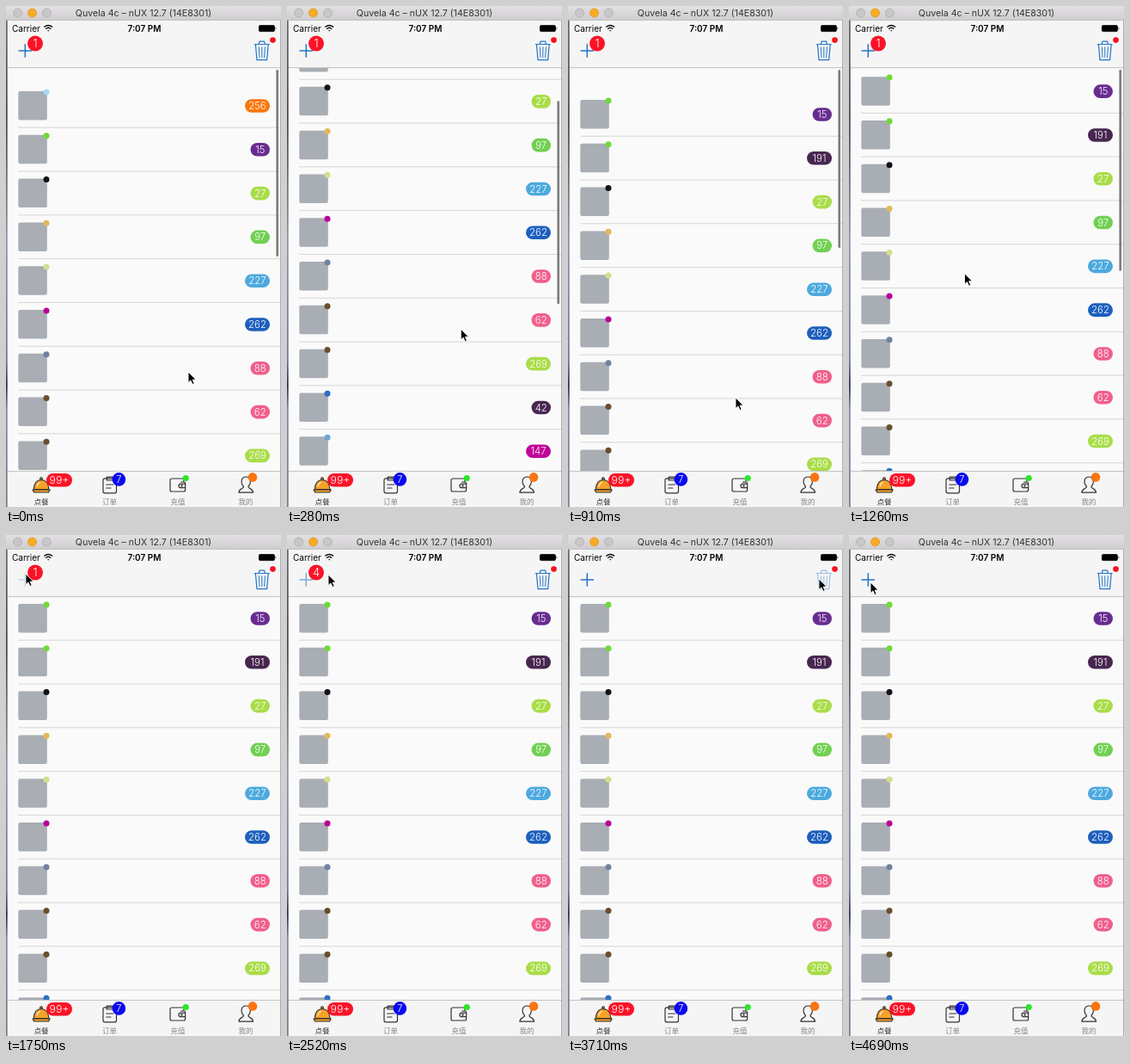
An HTML page that plays this animation: 320 px wide and 582 px high, repeating every 4.76 s.

```html
<!DOCTYPE html>
<html lang="en">
<head>
<meta charset="utf-8">
<title>Badge list</title>
<style>
  html, body { margin: 0; width: 100%; height: 100%; overflow: hidden; background: #fafafa; }
  svg { display: block; width: 100%; height: 100%; font-family: Inter, "Noto Sans", sans-serif; }
  .num { fill: #fff; font-weight: 300; text-anchor: middle; }
  .line { fill: none; stroke: #333; stroke-width: 1.2; stroke-linejoin: round; stroke-linecap: round; }
  .tab { font: 8.5px "Noto Sans CJK SC", "Noto Sans CJK", sans-serif; fill: #858585; text-anchor: middle; }
  .blue { fill: none; stroke: #2474c6; }
</style>
</head>
<body>
<svg viewBox="0 0 320 582" preserveAspectRatio="none">
  <defs>
    <linearGradient id="bar" x2="0" y2="1">
      <stop stop-color="#e2e0e2"/><stop offset="1" stop-color="#cfcdcf"/>
    </linearGradient>
    <linearGradient id="edge" x2="0" y2="1">
      <stop stop-color="#6a6670"/><stop offset=".2" stop-color="#454450"/>
      <stop offset=".45" stop-color="#8d92a6"/><stop offset=".7" stop-color="#6d7696"/>
      <stop offset=".75" stop-color="#252b48"/><stop offset=".8" stop-color="#8187a0"/>
      <stop offset="1" stop-color="#777b8e"/>
    </linearGradient>
    <clipPath id="view"><path d="M0 72H320V540H0Z"/></clipPath>
  </defs>

  <path d="M0 0H320V582H0Z" fill="#fafafa"/>
  <g clip-path="url(#view)">
    <g id="rows"></g>
    <rect id="thumb" x="314.4" width="2.6" rx="1.3" fill="#7c7c7c"/>
  </g>

  <!-- navigation bar -->
  <path d="M0 16H320V72H0Z" fill="#f5f5f5"/>
  <path d="M0 71.7H320" stroke="#b4b4b4" stroke-width=".8"/>
  <text x="7" y="29.7" font-size="10">Carrier</text>
  <g fill="none" stroke="#111" stroke-width="1.4">
    <path d="M44.3 24.6Q49.2 20.2 54.1 24.6M46.2 26.7Q49.2 24 52.2 26.7"/>
    <path d="M48 28.4L49.2 29.5L50.4 28.4Q49.2 27.4 48 28.4Z" fill="#111" stroke="none"/>
  </g>
  <text x="161" y="29.7" font-size="10" font-weight="600" text-anchor="middle">7:07 PM</text>
  <rect x="294.4" y="22.6" width="18" height="7" rx="1.4" stroke="#111" stroke-width=".9"/>
  <path d="M313.6 24.6Q315.3 26 313.6 27.7Z"/>
  <path id="plus" class="blue" d="M14.5 52H30M22.3 44.3V59.8" stroke-width="1.5"/>
  <g id="badge">
    <circle cx="34" cy="43.6" r="9" fill="#fb1226"/>
    <text id="count" class="num" x="34" y="48.2" font-size="13">1</text>
  </g>
  <g id="trash" class="blue" stroke-width="1.2" stroke-linecap="round" stroke-linejoin="round">
    <path d="M289.3 44.5H306.2M294.3 44.2L295 41.2H300.6L301.3 44.2"/>
    <path d="M290.4 44.8L292 62.6H303.6L305.2 44.8"/>
    <path d="M294.2 47.8L295 59.6M297.8 47.8V59.6M301.4 47.8L300.6 59.6" stroke-width="1"/>
  </g>
  <circle cx="310.5" cy="39.6" r="3.3" fill="#f6101e"/>

  <!-- tab bar -->
  <path d="M0 540H320V582H0Z" fill="#f5f5f5"/>
  <path d="M0 540.4H320" stroke="#b4b4b4" stroke-width=".8"/>
  <g class="line">
    <path d="M32.3 561.5Q33 550.5 41 550.5Q49 550.5 50 561.5Z" fill="#f7a128"/>
    <path d="M31 562H51.2L49.5 565H32.7Z" fill="#f7a128"/>
    <circle cx="41" cy="549.2" r="1.4" fill="#f7a128"/>
    <path d="M36 558Q36.7 554.6 39.5 553.4" stroke="#fff0cc"/>
    <rect x="113" y="548.8" width="15.5" height="17" rx="2"/>
    <path d="M117.2 547.2H124.3V551H117.2ZM116.7 556H124.8M116.7 560H122"/>
    <path d="M206.8 553V550.5Q206.8 549 205.2 549H193Q191 549 191 551V562Q191 564 193 564H206.8Q208.6 564 208.6 562V554.5Q208.6 553 207 553H203.5"/>
    <path d="M208.6 555.2H203.5Q201 555.2 201 557.4Q201 559.6 203.5 559.6H208.6"/>
    <circle cx="204.5" cy="557.4" r=".6"/>
    <path d="M276.5 558.2C272.7 554.2 273.3 547 279.2 547C285.1 547 285.7 554.2 281.9 558.2C281.6 560.7 287.5 560.3 287.5 565.2H270.9C270.9 560.3 276.8 560.7 276.5 558.2Z"/>
  </g>
  <rect x="47" y="543" width="30" height="15.4" rx="7.7" fill="#fb1226"/>
  <text class="num" x="62" y="555" font-size="12.3">99+</text>
  <circle cx="131.4" cy="549.9" r="7.8" fill="#0808f2"/>
  <text class="num" x="131.4" y="553.8" font-size="11">7</text>
  <circle cx="209.2" cy="548.5" r="3.6" fill="#2be62b"/>
  <circle cx="287" cy="547.4" r="5.3" fill="#fb7410"/>
  <text class="tab" x="41" y="579" style="fill:#303030;font-weight:500">点餐</text>
  <text class="tab" x="120.5" y="579">订单</text>
  <text class="tab" x="200" y="579">充值</text>
  <text class="tab" x="279" y="579">我的</text>

  <!-- window frame -->
  <path d="M0 16H1.7V582H0Z" fill="url(#edge)"/>
  <path d="M319.3 16H320V582H319.3Z" fill="#8c8c94"/>
  <path d="M0 0H320V16.6H0Z" fill="url(#bar)"/>
  <path d="M0 16.4H320" stroke="#b2b0b2" stroke-width=".7"/>
  <g stroke-width=".7">
    <circle cx="13.6" cy="8" r="5" fill="#c9c7c9" stroke="#aaa8aa"/>
    <circle cx="30.5" cy="8" r="5" fill="#f8ab24" stroke="#dc9420"/>
    <circle cx="47.3" cy="8" r="5" fill="#c9c7c9" stroke="#aaa8aa"/>
  </g>
  <text x="160" y="12" font-size="10.6" fill="#333" text-anchor="middle">Quvela 4c – nUX 12.7 (14E8301)</text>

  <path id="cursor" d="M0 0V12.6L2.9 9.9L5 14.5L7.1 13.6L5.1 9.1H9Z" fill="#000" stroke="#fff" stroke-width=".9"/>
</svg>
<script>
const LOOP = 4760, STEP = 70, PITCH = 50.8;
const $ = id => document.getElementById(id);

// value, pill colour, dot colour
const first = [[256, '#fb770c', '#a9d8f2'], [15, '#682c91', '#6edb38']];
const list = [
  [15, '#682c91', '#6edb38'], [191, '#482650', '#6edb38'], [27, '#a9dd48', '#141418'],
  [97, '#71d052', '#e2b95a'], [227, '#4ca9de', '#d2e08f'], [262, '#1d5fbd', '#ba0098'],
  [88, '#f05f8c', '#7182a0'], [62, '#f05f8c', '#6a4e2c'], [269, '#a9dd48', '#6a4e2c'],
  [42, '#482650', '#2a70c4'], [147, '#c0049a', '#6ea6d0'], [2, '#cde6a2', '#72b2e6'],
  [256, '#fb770c', '#a9d8f2']
];

function cell([value, pill, dot], i) {
  const w = [16, 22.5, 29][String(value).length - 1];
  return `<g transform="translate(0 ${i * PITCH})">
    <rect x="14.3" y="80" width="33.5" height="33.5" rx="2" fill="#a9adb4"/>
    <circle cx="47" cy="80.9" r="3.5" fill="${dot}"/>
    <rect x="${307 - w}" y="89.2" width="${w}" height="15.6" rx="7.8" fill="${pill}"/>
    <text class="num" x="${307 - w / 2}" y="101.1" font-size="11.4">${value}</text>
    <path d="M14 122.2H320" stroke="#d2d2d2" stroke-width=".9"/></g>`;
}

const rows = $('rows');
rows.innerHTML = ['', ''].map((_, k) =>
  `<g>${(k ? list : first).slice(0, 2).map(cell).join('')}</g>`).join('') +
  list.slice(2).map((c, i) => cell(c, i + 2)).join('');
const [before, after] = rows.children;

const clamp = v => Math.max(0, Math.min(1, v));
const ease = v => v * v * (3 - 2 * v);

// Eased interpolation through [time, ...values] stops
function track(stops, t) {
  let i = 0;
  while (i < stops.length - 2 && t >= stops[i + 1][0]) i++;
  const [a, b] = [stops[i], stops[i + 1]];
  const k = ease(clamp((t - a[0]) / (b[0] - a[0])));
  return a.slice(1).map((v, n) => v + (b[n + 1] - v) * k);
}

const scroll = [[0, -19], [490, 157], [910, -29], [1330, 0]];
const path = [
  [0, 212, 425], [490, 196, 343], [840, 195, 455], [980, 195, 455], [1680, 23, 45],
  [2380, 23, 45], [2520, 48, 46], [3360, 292, 51], [3850, 292, 51], [4620, 25, 55]
];
const addTaps = [[1750, 1820], [2030, 2100], [2310, 2380]];
const clearTaps = [[3500, 3640]];

// Pressed buttons dim at once and fade back after release
function glow(taps, t) {
  const tap = taps.filter(p => t >= p[0]).pop();
  if (!tap) return 1;
  return t < tap[1] ? 0.25 : 0.25 + 0.75 * clamp((t - tap[1]) / 320);
}

function draw(t) {
  const [y] = track(scroll, t);
  rows.setAttribute('transform', `translate(0 ${-y})`);
  before.style.display = t < 455 ? '' : 'none';
  after.style.display = t < 455 ? 'none' : '';

  $('thumb').setAttribute('y', 74 + Math.max(0, y) * 0.414);
  $('thumb').setAttribute('height', 236 + Math.min(0, y));
  $('thumb').style.opacity = 1 - clamp((t - 1330) / 280);

  $('plus').style.opacity = glow(addTaps, t);
  $('trash').style.opacity = glow(clearTaps, t);
  $('count').textContent = 1 + addTaps.filter(p => t >= p[1]).length;
  $('badge').style.display = t < clearTaps[0][1] ? '' : 'none';

  $('cursor').setAttribute('transform', `translate(${track(path, t)})`);
}

let start;
function tick(now) {
  start ??= now;
  draw(Math.floor((now - start) % LOOP / STEP) * STEP);
  requestAnimationFrame(tick);
}
draw(0);
requestAnimationFrame(tick);
</script>
</body>
</html>
```
